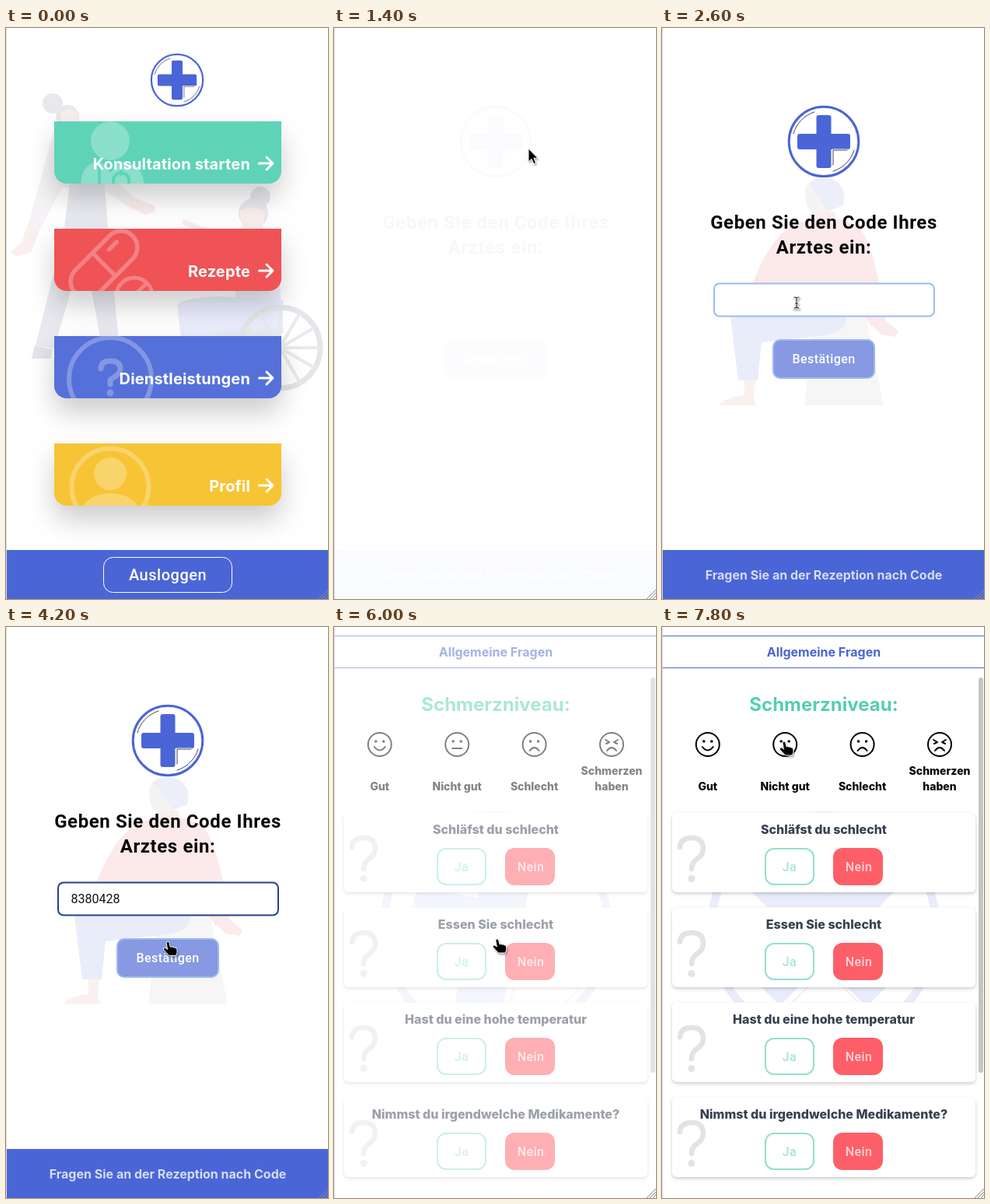
An HTML page that plays this animation: 414x734 px, repeating every 8000 ms.

```html
<!DOCTYPE html>
<html lang="de">
<head>
<meta charset="utf-8">
<style>
  html, body { margin: 0; width: 100%; height: 100%; overflow: hidden; background: #fff; }
  svg { display: block; width: 414px; height: 734px; }
  .inter { font-family: Inter, sans-serif; font-weight: 700; }
  .roboto { font-family: Roboto, sans-serif; font-weight: 500; }
  .mid { text-anchor: middle; }
  .line { fill: none; stroke-linecap: round; stroke-linejoin: round; }
  .tile { filter: drop-shadow(0 18px 17px #0003); }
  .panel { filter: drop-shadow(0 2px 2px #0003); }
  .cursor { filter: drop-shadow(1px 2px 1px #0005); }
</style>
</head>
<body>
<svg id="stage" viewBox="0 0 414 734"></svg>
<script>
const BLUE = '#4a65d6', LOOP = 8000;
const CODE = '8380428';

const label = (x, y, size, text, fill, cls = 'inter mid', extra = '') =>
  `<text x="${x}" y="${y}" font-size="${size}" fill="${fill}" class="${cls}" ${extra}>${text}</text>`;
const shape = (d, fill) => `<path d="${d}" fill="${fill}"/>`;
const line = (d, stroke, width) => `<path class="line" d="${d}" stroke="${stroke}" stroke-width="${width}"/>`;
const disc = (x, y, r, fill) => `<circle cx="${x}" cy="${y}" r="${r}" fill="${fill}"/>`;
const ring = (x, y, r, stroke, width) =>
  `<circle cx="${x}" cy="${y}" r="${r}" fill="none" stroke="${stroke}" stroke-width="${width}"/>`;
const box = (x, y, w, h, r, fill, extra = '') =>
  `<rect x="${x}" y="${y}" width="${w}" height="${h}" rx="${r}" fill="${fill}" ${extra}/>`;

// Medical cross in a ring, centred on the origin
const cross = color => box(-9.5, -34, 19, 68, 3, color) + box(-34, -10, 68, 20, 3, color);
const badge = (x, y, scale) => `<g transform="translate(${x} ${y}) scale(${scale})">
  ${ring(0, 0, 44.8, BLUE, 3) + cross(BLUE)}
  ${line('M12 30V11H30', '#fff', 3)}
  ${line('M12 30V11H30M-39-10A40 40 0 0 1-12-38M12 38A40 40 0 0 0 39 11', '#334', 0.9)}</g>`;

const footer = box(0, 671, 414, 63, 0, BLUE);

function menuScene() {
  const walker =
    disc(60, 97, 13, '#e9e8ed') + disc(79, 114, 15, '#e9e8ed') +
    shape('M70 108Q92 98 94 118L88 138H74Z', '#faefed') +
    shape('M62 130Q92 118 118 150L130 205H72L42 262 28 255Z', '#f5f3f5') +
    shape('M28 252L42 262 32 288 13 294 6 288 20 276Z', '#faefed') +
    shape('M118 175L165 218 158 230 112 200Z', '#f5f3f5') +
    shape('M162 217L192 229 192 236 178 240 158 230Z', '#faeeec') +
    shape('M82 200H127L132 270 145 402 122 404 100 280 62 412 38 408 74 265Z', '#e9eaf0') +
    shape('M37 408L60 413 58 425H33Z', '#e4e5ec');
  const spokes = Array.from({ length: 6 }, (_, i) => {
    const a = i * Math.PI / 6, x = 50 * Math.cos(a), y = 50 * Math.sin(a);
    return `M${352 - x} ${411 - y}L${352 + x} ${411 + y}`;
  }).join('');
  const sitter =
    disc(327, 217, 13, '#e9e8ed') + disc(318, 238, 19, '#e9e8ed') +
    shape('M300 236Q312 226 333 236L329 264H306Z', '#faefed') +
    shape('M288 264Q325 250 348 280L357 392H300Z', '#eeeffb') +
    line('M292 276L258 262 230 250', '#f9eeed', 7) +
    shape('M220 356Q228 346 275 345L356 350V392L275 394 262 455H232Z', '#e9edfc') +
    line('M275 394H350M300 394V450', '#e9eaee', 8) +
    ring(352, 411, 52, '#e5e6ea', 7) + line(spokes, '#e9eaee', 4);

  const W = '#fff';
  const icons = [
    disc(134, 145, 25, W) +
      shape('M96 204Q96 172 122 172L134 186 146 172Q176 172 178 204Z', W) +
      line('M120 174V200M148 174V188M138 202V196A10 10 0 0 1 158 196V202', '#5fd3b7', 4),
    line('M-52 0A21 21 0 0 1-31-21H31A21 21 0 0 1 31 21H-31A21 21 0 0 1-52 0M0-21V21M18-9H32', W, 5.5)
        .replace('<path', '<path transform="translate(126 304) rotate(-45)"') +
      ring(165, 344, 23, W, 5) + line('M150 358L180 329', W, 5),
    ring(134, 451, 53, W, 6) + line('M122 438Q122 428 134 428 147 428 147 438 147 445 134 452V458', W, 7) +
      disc(134, 469, 4.5, W),
    ring(134, 590, 49.5, W, 6) + disc(134, 573, 21, W) +
      shape('M96 618Q108 598 134 598T172 618Z', W)
  ];
  const tiles = [
    ['Konsultation starten', '#5fd3b7'], ['Rezepte', '#ef5355'],
    ['Dienstleistungen', '#5570d9'], ['Profil', '#f7c435']
  ].map(([text, color], i) => {
    const y = 120 + 138 * i;
    const outline = `M62 ${y}H354V${y + 64}a16 16 0 0 1-16 16H78a16 16 0 0 1-16-16Z`;
    return `<clipPath id="tile${i}"><path d="${outline}"/></clipPath>
      <path class="tile" d="${outline}" fill="${color}"/>
      <g clip-path="url(#tile${i})"><g opacity=".27">${icons[i]}</g></g>
      ${label(314, y + 62, 20, text, '#fff', 'inter', 'text-anchor="end" letter-spacing=".15"')}
      ${line(`M325.5 ${y + 54}H342M335 ${y + 46}L343 ${y + 54} 335 ${y + 62}`, '#fff', 3)}`;
  }).join('');
  return walker + sitter + badge(220, 67, 0.74) + tiles + footer +
    box(125.5, 680.5, 165, 45, 12, 'none', 'stroke="#fff"') +
    label(208, 710, 20, 'Ausloggen', '#fff', 'roboto mid', 'letter-spacing=".5"');
}

function codeScene() {
  const figure =
    shape('M195 370H262L285 485H183Z', '#f6f6f7') +
    shape('M184 214Q183 194 206 193L214 240Q190 242 186 228Z', '#f6f3f3') +
    shape('M190 200Q204 189 222 196 238 206 233 228L214 236Z', '#eceff9') +
    shape('M196 236H222L226 256H190Z', '#faefee') +
    shape('M176 250Q220 236 250 254 272 270 288 378L270 384 240 344 238 372H150L112 340Q140 262 176 250Z', '#fce9ea') +
    shape('M270 382L288 376 304 390 300 397 282 394Z', '#faeceb') +
    shape('M88 371H238Q236 394 200 396L128 404 123 453H98Z', '#e9edfa') +
    shape('M106 453H120L118 474 121 485H73Q82 474 106 472Z', '#faf1ef');
  return figure + badge(208, 146, 1) +
    ['Geben Sie den Code Ihres', 'Arztes ein:'].map((text, i) =>
      label(208, 258 + 32 * i, 24, text, '#080808', 'roboto mid', 'letter-spacing=".6" style="font-weight:600"')).join('') +
    box(67, 328.5, 283, 42, 7, '#fff', 'id="field" stroke-width="2"') +
    label(83.5, 355, 16, '', '#111', 'roboto', 'id="typed" style="font-weight:400"') +
    box(143, 401, 130, 49, 9, '#8699e2', 'stroke="#9db8f4" stroke-width="2"') +
    label(208, 431, 16, 'Bestätigen', '#fff', 'roboto mid', 'letter-spacing=".4"') +
    footer + label(208, 709, 16, 'Fragen Sie an der Rezeption nach Code', '#d6dcf6');
}

function questionScene() {
  const tint = '#e9ecfa', green = '#55ceb1';
  const eyes = disc(-5, -4, 1.8, '#000') + disc(5, -4, 1.8, '#000');
  const stroke = d => line(d, '#000', 2);
  const moods = [
    ['Gut', eyes + stroke('M-7 3Q0 12 7 3')],
    ['Nicht gut', eyes + stroke('M-6 5H6')],
    ['Schlecht', eyes + stroke('M-6 8Q0 0 6 8')],
    ['Schmerzen haben', stroke('M-8-6L-3-3-7-1M8-6L3-3 7-1M-6 8Q0 0 6 8')]
  ].map(([text, face], i) => {
    const x = 58.8 + 99.4 * i, words = i === 3 ? text.split(' ') : [text];
    return `<g transform="translate(${x} 151)">${ring(0, 0, 15, '#000', 2) + face}</g>` +
      words.map((word, k) =>
        label(x, 210 - 20 * (words.length - 1 - k), 14, word, '#080808', 'inter mid', 'style="font-weight:800"')).join('');
  }).join('');
  const panels = [
    'Schläfst du schlecht', 'Essen Sie schlecht',
    'Hast du eine hohe temperatur', 'Nimmst du irgendwelche Medikamente?'
  ].map((text, i) => `<g transform="translate(0 ${122 * i})">
    ${box(13, 238.5, 390, 102.5, 6, '#fff', 'class="panel"')}
    ${line('M23 283Q24 271 38 271 53 271 53 285 53 293 45 298 38 303 38 311', '#e3e3e3', 6.5)}
    ${disc(38, 323.5, 4.5, '#e3e3e3')}
    ${label(208, 266, 16, text, '#374151', 'inter mid', 'style="font-weight:800"')}
    ${box(133, 285, 62, 46, 11, '#fff', 'stroke="#92e1ce" stroke-width="2"')}
    ${label(164, 314, 16, 'Ja', '#a6e5d6', 'roboto mid', 'letter-spacing=".4"')}
    ${box(220, 284, 64, 48, 12, '#fd5f69')}
    ${label(253, 314, 16, 'Nein', '#fed3d6', 'roboto mid', 'letter-spacing=".4"')}</g>`).join('');
  return `<g id="spinner">${ring(0, 0, 44.5, tint, 3.2) + cross(tint)}
      ${line('M12 30V11H30M-39-10A40 40 0 0 1-12-38M12 38A40 40 0 0 0 39 11', '#f1f1f4', 0.6)}</g>` +
    shape('M0 11H414V12H0ZM0 52H414V53H0Z', BLUE) +
    label(208, 38, 16, 'Allgemeine Fragen', '#4b65d0') +
    label(208, 108, 24, 'Schmerzniveau:', green) +
    moods + panels + box(407, 65, 6, 508, 3, '#c5c5c5');
}

// Pointers have their hot spot at the origin
const pointers = {
  arrow: '<path d="M0 0V17L4 13.4 6.8 19.6 9.6 18.4 6.9 12.3H12Z" fill="#000" stroke="#fff"/>',
  hand: `<path d="M-2 1Q-2-1 0-1 1.6-1 2 1L3.2 6Q5 4.8 6.2 6.2 8 5.4 9 7 11.6 6.4 11.8 9L12 13
    10.5 17H1.5L-5.5 9.5Q-6.5 7-3.5 7L-0.5 9Z" fill="#000" stroke="#fff"/>`,
  beam: line('M-3-7Q0-7 0-5 0-7 3-7M0-5V5M-3 7Q0 7 0 5 0 7 3 7M-1.5 1H1.5', '#fff', 3) +
    line('M-3-7Q0-7 0-5 0-7 3-7M0-5V5M-3 7Q0 7 0 5 0 7 3 7M-1.5 1H1.5', '#222', 1.1)
};

const stage = document.getElementById('stage');
stage.innerHTML = `
  <g id="menu">${menuScene()}</g><g id="code">${codeScene()}</g><g id="questions">${questionScene()}</g>
  ${box(0, 0, 1, 734, 0, '#dcdcdc')}
  ${line('M402 734L414 722M406 734L414 726M410 734L414 730', '#8a8a8a', 1)}
  <g id="cursor" class="cursor">${Object.entries(pointers).map(([k, s]) => `<g id="${k}">${s}</g>`).join('')}</g>`;

const el = id => document.getElementById(id);
const show = (id, on) => el(id).setAttribute('display', on ? 'inline' : 'none');
const smooth = p => { p = Math.min(1, Math.max(0, p)); return p * p * (3 - 2 * p); };

// Pointer path: time, x, y
const path = [
  [250, 430, 640], [1000, 252, 165], [1200, 250, 155], [1700, 250, 155], [2400, 173, 353],
  [3750, 173, 353], [4150, 208, 405], [4700, 213, 421], [5900, 213, 421], [6500, 171, 169],
  [7000, 171, 169], [7500, 157, 148], [LOOP, 157, 148]
];

function pointerAt(t) {
  const i = Math.max(1, path.findIndex(p => p[0] >= t));
  const [t0, x0, y0] = path[i - 1], [t1, x1, y1] = path[i];
  const p = smooth((t - t0) / (t1 - t0));
  return [x0 + (x1 - x0) * p, y0 + (y1 - y0) * p];
}

function pointerKind(t, x, y) {
  if (t >= 5300) return 'hand';
  if (t < 1300) {
    const overTile = x > 62 && x < 354 && y >= 120 && (y - 120) % 138 < 80;
    return overTile ? 'hand' : 'arrow';
  }
  if (y > 328 && y < 371) return 'beam';
  return y >= 400 ? 'hand' : 'arrow';
}

function draw(t) {
  show('menu', t < 1300);
  show('code', t >= 1300 && t < 5300);
  show('questions', t >= 5500);
  el('code').setAttribute('opacity', smooth((t - 1300) / 1000));
  el('questions').setAttribute('opacity', smooth((t - 5500) / 1000));
  el('spinner').setAttribute('transform',
    `translate(208 387) scale(3.25) rotate(${(t - 5300) * 0.018})`);

  el('field').setAttribute('stroke', t < 2750 ? '#9bbcf4' : '#24408f');
  const count = Math.floor((t - 2900) / 120) + 1;
  el('typed').textContent = CODE.slice(0, Math.max(0, count));

  const [x, y] = pointerAt(t), kind = pointerKind(t, x, y);
  el('cursor').setAttribute('transform', `translate(${x} ${y})`);
  show('cursor', t > 250 && !(t > 2900 && t < 3750));
  Object.keys(pointers).forEach(k => show(k, k === kind));
}

const start = performance.now();
(function tick() {
  draw((performance.now() - start) % LOOP);
  requestAnimationFrame(tick);
})();
</script>
</body>
</html>
```
